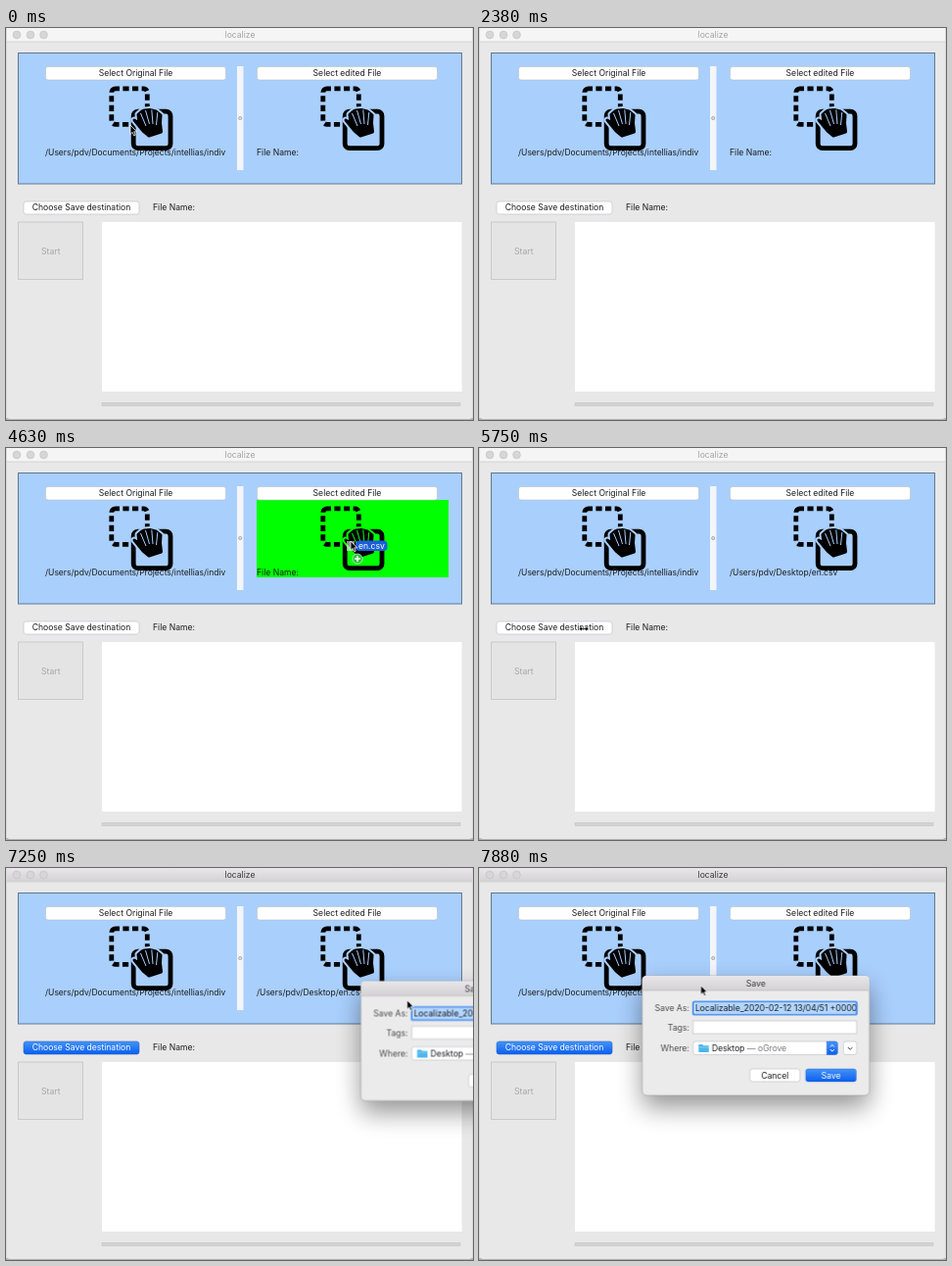
These frames come from a looping animation (477x400 px, 8 s). An HTML page:

```html
<!DOCTYPE html>
<html lang="en">
<head>
<meta charset="utf-8">
<title>localize</title>
<style>
html, body { margin: 0; width: 100%; height: 100%; overflow: hidden; background: #f2f2f2; }
svg { display: block; width: 477px; height: 400px; }
text { font: 8.6px Inter, "Open Sans", sans-serif; fill: #1c1c1c; }
.mid { text-anchor: middle; }
.end { text-anchor: end; fill: #4c4c4c; }
.path { font-size: 8.5px; }
.white { fill: #fff; }
.btn { fill: #fff; stroke: #b9bdc4; stroke-width: .6; }
.go { fill: url(#go); stroke: #1257cc; stroke-width: .4; }
.field { fill: #fff; stroke: #c3c3c3; stroke-width: .7; }
.ring { fill: none; stroke: #5598f2; stroke-width: 2.2; }

/* One 125 ms tick is 1.5625% of the loop */
.on { opacity: 0; animation: 8s step-end infinite; }
.fresh { animation-name: fresh; }
.dropped { animation-name: dropped; }
.hot { animation-name: hot; }
.drag { animation-name: drag; }
.idle { animation-name: idle; }
.active { animation-name: active; }
.key { animation-name: key; }
.resize { animation-name: resize; }
.arrow { animation-name: arrow; }
@keyframes fresh { 0% { opacity: 1 } 62.5%, 100% { opacity: 0 } }
@keyframes dropped { 0% { opacity: 0 } 62.5%, 100% { opacity: 1 } }
@keyframes hot { 0% { opacity: 0 } 54.6875% { opacity: 1 } 62.5%, 100% { opacity: 0 } }
@keyframes drag { 0% { opacity: 0 } 51.5625% { opacity: 1 } 62.5%, 100% { opacity: 0 } }
@keyframes idle { 0% { opacity: 1 } 75%, 100% { opacity: 0 } }
@keyframes active { 0% { opacity: 0 } 75%, 100% { opacity: 1 } }
@keyframes key { 0% { opacity: 0 } 75% { opacity: 1 } 82.8125%, 100% { opacity: 0 } }
@keyframes resize { 0% { opacity: 0 } 70.3125% { opacity: 1 } 75%, 100% { opacity: 0 } }
@keyframes arrow { 0% { opacity: 1 } 70.3125% { opacity: 0 } 75%, 100% { opacity: 1 } }

.pointer { animation: point 8s step-end infinite; }
@keyframes point {
  0% { transform: translate(127px, 99px) }
  1.5625% { transform: translate(127px, 99px); animation-timing-function: steps(7) }
  12.5% { transform: translate(490px, 125px) }
  51.5625% { transform: translate(490px, 130px); animation-timing-function: steps(4) }
  57.8125% { transform: translate(352px, 95px) }
  62.5% { transform: translate(352px, 95px); animation-timing-function: steps(5) }
  70.3125% { transform: translate(107px, 183px) }
  76.5625% { transform: translate(107px, 183px); animation-timing-function: steps(3) }
  81.25% { transform: translate(257.3px, 200.6px); animation-timing-function: steps(2) }
  84.375% { transform: translate(495px, 150px) }
  87.5% { transform: translate(480px, 140px); animation-timing-function: steps(2) }
  90.625% { transform: translate(409.6px, 134.8px); animation-timing-function: steps(5) }
  98.4375%, 100% { transform: translate(226.5px, 119.8px) }
}
.dialog { animation: slide 8s step-end infinite; }
@keyframes slide {
  0% { transform: translate(560px, 120px) }
  85.9375% { transform: translate(500px, 120px); animation-timing-function: steps(3) }
  90.625% { transform: translate(362.5px, 115.5px); animation-timing-function: steps(5) }
  98.4375%, 100% { transform: translate(166.7px, 110px) }
}
</style>
</head>
<body>
<svg viewBox="0 0 477 400">
  <defs>
    <linearGradient id="go" x2="0" y2="1"><stop stop-color="#4593f8"/><stop offset="1" stop-color="#0b5fee"/></linearGradient>
    <linearGradient id="bar" x2="0" y2="1"><stop stop-color="#e9e7e9"/><stop offset="1" stop-color="#d3d1d3"/></linearGradient>
    <filter id="blur" x="-30%" y="-40%" width="160%" height="190%"><feGaussianBlur stdDeviation="13"/></filter>
    <clipPath id="pathClip"><rect x="38" y="118" width="186" height="16"/></clipPath>
    <clipPath id="nameClip"><rect x="53" y="27" width="165.5" height="12"/></clipPath>

    <!-- Hand silhouette, reused to cut a gap out of the squares -->
    <path id="hand" stroke-linejoin="round" d="M26 35L31 38L30 29.5L34 26L36.5 25L42 24.5L48 26L53 30L52.5 38L53.5 47L41 51L35 46Z"/>
    <mask id="gap" maskUnits="userSpaceOnUse" x="0" y="0" width="70" height="70">
      <path fill="#fff" d="M0 0H70V70H0Z"/>
      <use href="#hand" stroke="#000" stroke-width="7"/>
    </mask>
    <mask id="slits" maskUnits="userSpaceOnUse" x="0" y="0" width="70" height="70">
      <path fill="#fff" d="M0 0H70V70H0Z"/>
      <path stroke="#000" stroke-width="1" d="M32.5 28L38 41M37.5 25L41.5 39M43.8 24.5L45 39M49.8 27L48.5 40"/>
    </mask>
    <g id="icon">
      <g mask="url(#gap)" fill="none" stroke="#000" stroke-width="4.8">
        <rect x="2.8" y="2.8" width="36.5" height="36.5" rx="4" stroke-dasharray="6.2 3.4" stroke-dashoffset="2"/>
        <rect x="25.2" y="26.2" width="37.8" height="37.5" rx="4.5"/>
      </g>
      <use href="#hand" stroke="#000" stroke-width="3" mask="url(#slits)"/>
    </g>
    <g id="lights"><circle cx="11" cy="7" r="3.9"/><circle cx="25" cy="7" r="3.9"/><circle cx="38.5" cy="7" r="3.9"/></g>
  </defs>

  <!-- Window -->
  <path d="M0 398H477V400H0Z" fill="#b0b0b0"/>
  <path d="M0 0H1V398H0ZM476 0H477V398H476Z" fill="#dcdcdc"/>
  <rect x="1" y="-6" width="475" height="405" rx="3" fill="#e8e8e8"/>
  <path d="M1 0H476V14H1Z" fill="#f5f5f5"/>
  <path class="on active" d="M1 0H476V14H1Z" fill="url(#bar)"/>
  <path d="M1 14H476" stroke="#cfcfcf" stroke-width=".8"/>
  <use href="#lights" fill="#d6d6d6" stroke="#c0c0c0" stroke-width=".6"/>
  <g class="on key">
    <circle cx="11" cy="7" r="4" fill="#ee5b52"/><circle cx="25" cy="7" r="4" fill="#f8b53a"/>
  </g>
  <text class="mid on idle" x="239" y="10" style="fill:#a3a3a3">localize</text>
  <text class="mid on active" x="239" y="10" style="fill:#3a3a3a">localize</text>

  <!-- Drop area -->
  <rect x="12.5" y="25.5" width="453" height="133.5" fill="#a9cffd" stroke="#5e7896"/>
  <rect class="on hot" x="256" y="53" width="196" height="79" fill="#0f0"/>
  <rect x="236" y="39" width="6.5" height="106" fill="#f3f5f8"/>
  <circle cx="239.2" cy="92" r="1.6" fill="#ddd" stroke="#999" stroke-width=".7"/>
  <rect class="btn" x="40.5" y="39.5" width="184" height="13.5" rx="2.5"/>
  <rect class="btn" x="256.5" y="39.5" width="184" height="13.5" rx="2.5"/>
  <rect class="ring on key" x="40" y="39" width="185.5" height="14.3" rx="3"/>
  <text class="mid" x="132.5" y="49.3">Select Original File</text>
  <text class="mid" x="348.5" y="49.3">Select edited File</text>
  <use href="#icon" x="105" y="59"/>
  <use href="#icon" x="321" y="59"/>
  <text class="path" x="40" y="130" clip-path="url(#pathClip)">/Users/pdv/Documents/Projects/intellias/indiv</text>
  <text class="on fresh" x="256" y="130">File Name:</text>
  <text class="path on dropped" x="256" y="130">/Users/pdv/Desktop/en.csv</text>

  <!-- Destination, log and progress -->
  <rect class="btn" x="18" y="177" width="118" height="13" rx="2.5"/>
  <text class="mid" x="77" y="186.3">Choose Save destination</text>
  <g class="on active">
    <rect class="go" x="18" y="177" width="118" height="13" rx="2.5"/>
    <text class="mid white" x="77" y="186.3">Choose Save destination</text>
  </g>
  <text x="150" y="186.3">File Name:</text>
  <rect x="12.5" y="198" width="66" height="58.5" fill="#e4e4e4" stroke="#c9c9c9"/>
  <text class="mid" x="45.8" y="230.5" style="fill:#a6a6a6">Start</text>
  <rect x="98" y="198" width="367.5" height="173" fill="#fff"/>
  <rect x="98" y="382.3" width="366" height="3.4" fill="#d2d2d2" stroke="#c5c5c5" stroke-width=".6"/>

  <!-- Save dialog -->
  <g class="dialog">
    <rect x="0" y="12" width="232" height="122" rx="5" opacity=".42" filter="url(#blur)"/>
    <rect width="232" height="122" rx="4.5" fill="#ebebeb" stroke="#a9a9a9" stroke-width=".7"/>
    <path d="M0 15V4.5Q0 0 4.5 0H227.5Q232 0 232 4.5V15Z" fill="url(#bar)"/>
    <path d="M0 15H232" stroke="#bdbdbd" stroke-width=".7"/>
    <text class="mid" x="116" y="11" style="fill:#3a3a3a">Save</text>
    <text class="end" x="48" y="36">Save As:</text>
    <text class="end" x="48" y="56">Tags:</text>
    <text class="end" x="48" y="77">Where:</text>
    <rect x="52" y="26.5" width="167" height="13" fill="#fff"/>
    <rect x="54" y="28" width="164.5" height="10" fill="#b2d6ff"/>
    <rect class="ring" x="52" y="26.5" width="167" height="13" rx="1.5"/>
    <text x="54" y="36" clip-path="url(#nameClip)">Localizable_2020-02-12 13/04/51 +0000</text>
    <rect class="field" x="52" y="46" width="167" height="13"/>
    <rect class="btn" x="52" y="67" width="147.5" height="13.5" rx="2.5"/>
    <path d="M57.5 70H61.5L62.5 71.2H68V78H57.5Z" fill="#4db5ec"/>
    <path d="M57.5 73H68" stroke="#8fd4f7" stroke-width=".8"/>
    <text x="71" y="77">Desktop <tspan fill="#777">— oGrove</tspan></text>
    <path class="go" d="M188.5 67H197Q199.5 67 199.5 69.5V78Q199.5 80.5 197 80.5H188.5Z"/>
    <path d="M192 72.5L194 70.3L196 72.5M192 75L194 77.2L196 75" fill="none" stroke="#fff"/>
    <rect class="btn" x="205.5" y="67" width="13.5" height="13.5" rx="2.5"/>
    <path d="M210 73L212.3 75.2L214.6 73" fill="none" stroke="#333"/>
    <rect class="btn" x="110" y="95" width="51" height="13" rx="2.5"/>
    <text class="mid" x="135.5" y="104.5">Cancel</text>
    <rect class="go" x="167" y="95" width="51.5" height="13" rx="2.5"/>
    <text class="mid white" x="192.7" y="104.5">Save</text>
  </g>

  <!-- Pointer and dragged file -->
  <g class="pointer">
    <g class="on drag">
      <rect x="-4" y="0" width="8" height="10" fill="#fff" opacity=".55"/>
      <rect x="5" y="-.5" width="32.5" height="10.5" rx="4" fill="#1b5fd6"/>
      <text class="white" x="8" y="7.8">en.csv</text>
      <circle cx="7" cy="18" r="5" fill="#2fbf3b" stroke="#d9f5db" stroke-width=".7"/>
      <path d="M4 18H10M7 15V21" stroke="#fff" stroke-width="1.6"/>
    </g>
    <path class="on arrow" d="M0 0V9.4L2.2 7.4L3.7 10.8L5.3 10.1L3.8 6.8H6.7Z" stroke="#fff" stroke-width=".8"/>
    <path class="on resize" d="M-5 1.5L-2 -1V.8H2V-1L5 1.5L2 4V2.2H-2V4Z" stroke="#fff" stroke-width=".5"/>
  </g>
</svg>
</body>
</html>
```
